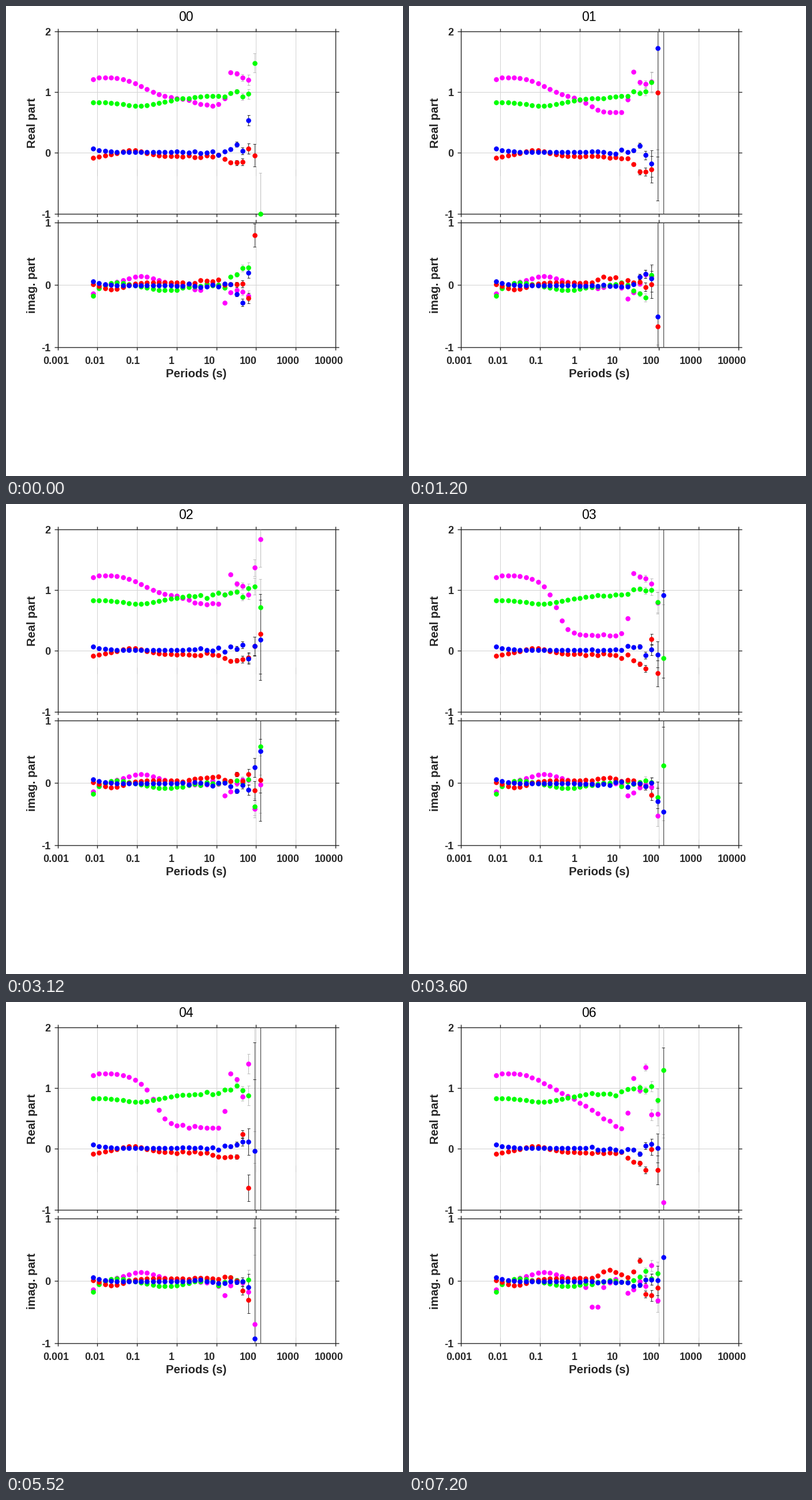
Animation, 688 px wide and 814 px high, one loop 8 s. Source, as a matplotlib script:

```python
import numpy as np
import matplotlib.pyplot as plt
from matplotlib.animation import FuncAnimation
from matplotlib.collections import LineCollection

W, H, DPI = 688, 814, 100
INK, GRID = "#262626", "#d2d2d2"
COLORS = ["#ff00ff", "#00ff00", "#ff0000", "#0000ff"]
LEFT, RIGHT = 89.5, 571.0
DECADE = (RIGHT - LEFT) / 7
# panel: top, bottom, pixel row of zero, pixels per unit
PANELS = {"real": (43.6, 359.6, 254.4, 105.2), "imag": (375.4, 591.4, 483.4, 108)}

I = np.arange(29)
# Period 2 ** ((i - 14) / 2) seconds on the logarithmic axis
COLUMN = LEFT + DECADE * (3 + (I - 14) * np.log10(2) / 2) + 0.15


def px(size):
    return size * 72 / DPI


def step(center, width):
    return 1 / (1 + np.exp(-(I - center) / width))


def bump(center, width):
    return np.exp(-((I - center) / width) ** 2)


def real_trends(onset, width, depth):
    """Smooth real curves; the magenta one dips, then jumps back up."""
    dip = 0.89 + 0.38 * step(8.3, -1.9) - 0.05 * np.exp(-I / 1.5) - depth * step(onset, width)
    back = np.interp(I, [21, 23], [0, 1]) ** 2
    return [
        dip + (1.28 - 0.07 * (I - 23) - dip) * back,
        0.83 - 0.06 * bump(7.5, 3) + 0.07 * step(13, 1) + 0.12 * step(22, 0.8),
        -0.06 + 0.1 * bump(6.5, 3.3) - 0.02 * np.exp(-I) - 0.1 * step(22, 0.8),
        0.06 * np.exp(-I / 1.6) + 0.012,
    ]


def imag_trends(place, notch, hump):
    """Smooth imaginary curves with a magenta notch and a red hump."""
    return [
        0.14 * bump(8, 4) - 0.14 * np.exp(-I / 0.9) - 0.25 * bump(22.3, 0.8)
        - notch * bump(place, 1.2),
        0.045 * bump(4, 2.2) - 0.17 * np.exp(-I) - 0.08 * bump(12, 4),
        0.04 - 0.11 * bump(3.3, 2.7) + hump * bump(19, 1.8),
        0.07 * np.exp(-I / 1.7) - 0.01,
    ]


def curve(trend, keys, rng):
    """Bend the trend through its long-period key points, scatter the rest."""
    at = list(keys)
    shift = np.interp(I, [22, *at], [0, *(keys[k] - trend[k] for k in at)])
    scatter = 0.007 * np.exp((I - 14) / 6) * rng.standard_normal(I.size)
    scatter[(I < 14) | np.isin(I, at)] = 0
    return (trend + shift + scatter)[: at[-1] + 1]


def error_bars(panel, y, reach):
    top, bottom, zero, unit = PANELS[panel]
    size = 0.08 * 2 ** ((I - 26) / 2) + reach * 12.0 ** (I - 28)
    # The noisiest stations keep bars for points beyond the panel.
    if reach > 0.9:
        y = np.pad(y, (0, I.size - len(y)), mode="edge")
    segs = []
    for x, v, e in list(zip(COLUMN, y, size))[23:]:
        a, b = zero - unit * (v + e), zero - unit * (v - e)
        segs.append([(x, max(a, top)), (x, min(b, bottom))])
        segs += [[(x - 2.5, c), (x + 2.5, c)] for c in (a, b) if top < c < bottom]
    return segs


def station(seed, dip, notch, noise, real, imag):
    rng = np.random.default_rng(seed)
    panels = {}
    for name, trends, keys in (("real", real_trends(*dip), real),
                               ("imag", imag_trends(*notch), imag)):
        curves = [curve(t, k, rng) for t, k in zip(trends, keys)]
        bars = [error_bars(name, y, noise * f)
                for y, f in zip(curves, (0.6, 0.6, 1, 1))]
        panels[name] = curves, bars[0] + bars[1], bars[2] + bars[3]
    return panels


# Key points are {period index: value}; the last one ends its curve.
STATIONS = [
    station(0, (17, 0.8, 0.12), (17.5, 0.1, 0.03), 0.85,
            [{26: 1.2}, {26: 0.97, 27: 1.48, 28: -1}, {25: -0.15, 26: 0.07, 27: -0.04},
             {24: 0.14, 25: 0.03, 26: 0.54}],
            [{26: -0.17}, {24: 0.17, 26: 0.28}, {25: 0.02, 26: -0.21, 27: 0.8},
             {23: 0.01, 25: -0.28, 26: 0.2}]),
    station(1, (15.5, 1, 0.22), (17, 0.06, 0.11), 20,
            [{26: 1.17}, {25: 1.01, 26: 1.16}, {25: -0.31, 26: -0.27, 27: 0.99},
             {24: 0.12, 26: -0.18, 27: 1.72}],
            [{26: 0.14}, {25: -0.2, 26: 0.16}, {26: 0.01, 27: -0.66},
             {25: 0.18, 26: 0.11, 27: -0.51}]),
    station(2, (16, 0.8, 0.12), (18, 0.04, 0.06), 0.5,
            [{26: 0.93, 27: 1.37, 28: 1.84}, {25: 0.89, 27: 1.06, 28: 0.72},
             {24: -0.16, 26: -0.11, 28: 0.28}, {25: 0.1, 26: -0.13, 28: 0.18}],
            [{26: 0.05, 27: -0.41, 28: -0.02}, {26: 0.06, 27: -0.38, 28: 0.59},
             {26: 0.14, 27: -0.12, 28: 0.05}, {26: -0.11, 27: 0.25, 28: 0.51}]),
    station(3, (10.2, 0.8, 0.64), (18, 0.03, 0.06), 1.2,
            [{26: 1.11, 27: 0.79}, {26: 1, 27: 0.8, 28: -0.12},
             {25: -0.29, 26: 0.19, 27: -0.37}, {26: 0.02, 27: -0.06, 28: 0.92}],
            [{26: -0.06, 27: -0.52}, {26: 0.01, 27: -0.23, 28: 0.28},
             {25: -0.05, 26: -0.19}, {26: 0, 27: -0.29, 28: -0.46}]),
    station(4, (10.6, 0.9, 0.53), (18, 0.02, 0.02), 20,
            [{24: 1.14, 25: 0.86, 26: 1.4}, {24: 1.04, 26: 0.88},
             {24: -0.13, 25: 0.24, 26: -0.64}, {26: 0.12, 27: -0.03}],
            [{24: 0.01, 26: -0.17, 27: -0.69}, {26: 0.02}, {24: 0, 26: -0.3},
             {25: -0.01, 26: -0.1, 27: -0.92}]),
    station(5, (17.5, 2.5, 0.55), (17.7, 0.42, 0.13), 20,
            [{24: 1.18, 25: 0.34, 26: 0.68}, {25: 1.18, 26: 1.1, 27: 0.67},
             {24: -0.18, 25: 0.29, 26: -0.24, 27: 1.2}, {25: -0.02, 26: -0.18}],
            [{25: -0.19, 26: 0.03}, {26: -0.01, 27: 0.38},
             {24: -0.05, 25: 0.52, 26: 0.04, 27: -0.77}, {25: 0.13, 26: 0.04, 27: -0.52}]),
    station(6, (16.5, 2.2, 0.6), (16.5, 0.5, 0.13), 1.5,
            [{24: 0.96, 25: 1.34, 26: 0.56, 27: 0.57, 28: -0.88},
             {26: 1.03, 27: 0.8, 28: 1.3}, {25: -0.35, 26: -0.01, 27: -0.35}, {27: 0.01}],
            [{25: -0.08, 26: 0.25, 27: -0.31}, {26: 0.04, 27: 0.12},
             {24: 0.33, 25: -0.21, 27: -0.11}, {27: 0.01, 28: 0.38}]),
]

fig = plt.figure(figsize=(W / DPI, H / DPI), dpi=DPI, facecolor="white")
ax = fig.add_axes([0, 0, 1, 1])
ax.set(xlim=(0, W), ylim=(H, 0))
ax.axis("off")


def line(x, y, color=INK, width=1.4, z=3):
    ax.plot(x, y, color=color, lw=px(width), zorder=z, solid_capstyle="butt")


def label(x, y, text, size, **kw):
    style = dict(ha="center", va="baseline", color=INK, weight="bold",
                 family="Liberation Sans")
    return ax.text(x, y, text, fontsize=px(size), **{**style, **kw})


dots, bars = {}, {}
for name, (top, bottom, zero, unit) in PANELS.items():
    mark = 288 if name == "real" else 586
    for k in range(8):
        x = LEFT + k * DECADE
        edge = k in (0, 7)
        if not edge:
            line([x, x], [top, bottom], GRID, 1, 1)
        line([x, x], [mark - 5.5, mark + 5.5], "#606060" if edge else "#c6c6c6", 1, 1)
        line([x, x], [top - 5, top])
        line([x, x], [bottom, bottom + 5])
    for v in range(-1, 3 if name == "real" else 2):
        y = zero - v * unit
        if top + 5 < y < bottom - 5:
            line([LEFT, RIGHT], [y, y], GRID, 1, 1)
        line([LEFT - 5.5, LEFT], [y, y])
        line([RIGHT, RIGHT + 5.5], [y, y])
        label(77.5, y + 7, str(v), 18, ha="right")
    line([LEFT, RIGHT, RIGHT, LEFT, LEFT], [top, top, bottom, bottom, top])
    bars[name] = [LineCollection([], colors=c, linewidths=px(1), zorder=z)
                  for c, z in (("#bdbdbd", 4), ("#303030", 5))]
    for lc in bars[name]:
        ax.add_collection(lc, autolim=False)
    dots[name] = [ax.plot([], [], "o", ms=px(8.6), mfc=c, mec="none", zorder=6 + k,
                          antialiased=False)[0] for k, c in enumerate(COLORS)]

for k, text in enumerate("0.001 0.01 0.1 1 10 100 1000 10000".split()):
    # Labels of four and more digits sit further right.
    x = 86.5 + 66.7 * k + (1.9 if k == 7 else 0) + (5 if k >= 6 else 0) * (k - 5) / 2
    label(x, 619.5, text, 17.8)
label(330, 643, "Periods (s)", 20.4)
for y, text in ((202, "Real part"), (483.5, "imag. part")):
    label(51, y, text, 20.4, rotation=90, rotation_mode="anchor")
title = label(311.5, 26, "", 23, weight="normal", color="black")


def update(i):
    n = i // 3
    title.set_text(f"{n:02d}")
    for name, (top, bottom, zero, unit) in PANELS.items():
        curves, *groups = STATIONS[n][name]
        for dot, y in zip(dots[name], curves):
            dot.set_data(COLUMN[: len(y)], zero - unit * y)
        for lc, segs in zip(bars[name], groups):
            lc.set_segments(segs)


update(0)
anim = FuncAnimation(fig, update, frames=20, interval=400, repeat=True, repeat_delay=0)
plt.show()
```
